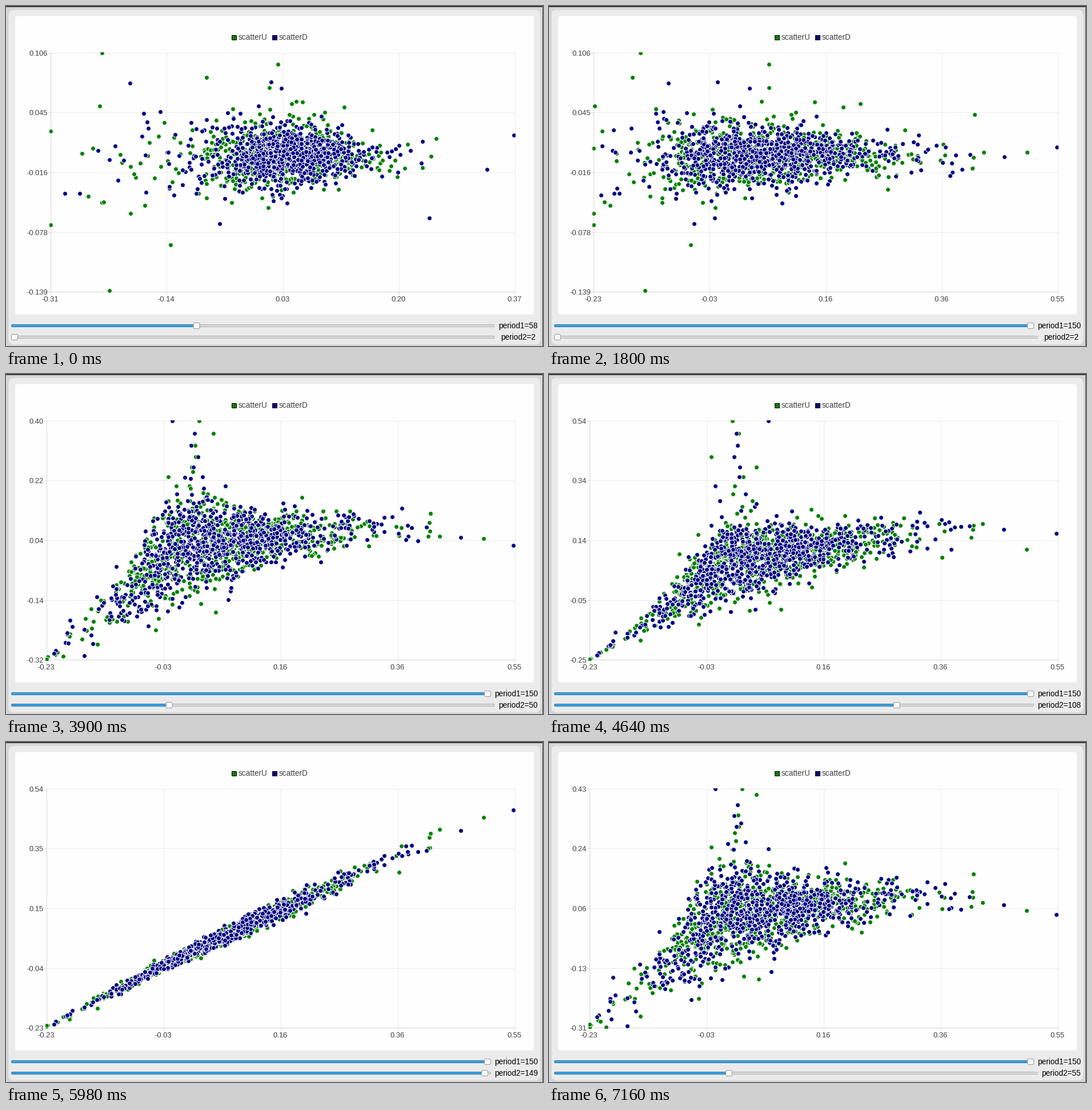
Write a matplotlib script that moves like this. It is 940 px wide and 595 px high and loops after 7.91 s.

```python
import numpy as np
import matplotlib.pyplot as plt
from matplotlib.animation import FuncAnimation
from matplotlib.patches import FancyBboxPatch, Rectangle

W, H, DPI = 940, 595, 100
LOOP, STEP = 7910, 35
PX = 72 / DPI
TOP, BOTTOM, RIGHT = 82, 500, 890
GREEN, NAVY = "#008000", "#000080"
plt.rcParams["font.family"] = "Liberation Sans"

# Key periods of both sliders and the axis ranges there
P1 = [58.5, 117.2, 150]
P2 = [2, 50, 55.2, 108.1, 149.1, 150]
X_LO, X_HI = [-.31, -.23, -.228], [.37, .49, .55]
Y_LO = [-.139, -.32, -.312, -.251, -.232, -.228]
Y_HI = [.1064, .40, .43, .54, .54, .55]

# Centre and half height of the cloud along x for periods 50, 108 and 149
BAND_X = [70, 160, 300, 450, 630, 890]
BAND_50 = [498, 420, 300, 287, 268, 297], [2, 50, 88, 42, 32, 10]
BAND_108 = [498, 442, 330, 305, 280, 273], [2, 20, 70, 45, 38, 22]
BAND_149 = [497, 450, 377, 307, 223, 120], [2, 8, 9, 18, 18, 40]

# A few far points: x at the three P1 keys and the first y
FAR_U = [(77, 77, 77, 383), (167, 159, 159, 82), (180, 152, 167, 498), (287, 239, 247, 418),
         (500, 778, 836, 256), (655, 859, 760, 256), (495, 550, 744, 190), (697, 616, 740, 284)]
FAR_D = [(102, 110, 113, 328), (216, 234, 208, 135), (640, 666, 888, 247), (670, 645, 796, 264),
         (841, 739, 722, 286), (609, 823, 701, 297), (888, 888, 646, 226), (740, 259, 289, 371)]


def warp(p):
    """Spread grows with sqrt(p) and collapses onto the diagonal near 150."""
    return np.sqrt(p) - np.sqrt(150 - np.asarray(p, float))


def widen(x):
    """Move x from the plot starting at 77 to the one starting at 70."""
    return 70 + (x - 77) * 820 / 813


def build(seed, far, n=830, plume=11):
    """x at the P1 keys and y at the P2 keys for one series."""
    rng = np.random.default_rng(seed)

    def mix(z, a):
        return a * z + np.sqrt(1 - a * a) * rng.normal(size=n)

    # Skewed bells with long tails
    z = rng.normal(size=n)
    xs = np.array([c + np.polyval([k3, k2, k1, 0], mix(z, .93)) for c, k1, k2, k3 in
                   ((492, 66, -7, 4.5), (380, 92, 6, 3), (375, 102, 6, 1))])
    v = rng.normal(size=n)
    s = np.interp(xs[2], [80, 250, 640, 890], [52, 29, 11, 25])
    y2 = 259 + s * (v + .05 * v ** 3)

    # A narrow plume rises from the cloud at larger second periods
    xs[2, :plume] = rng.normal(338, 23, plume)
    m = len(far)
    xs[:, -m:], y2[-m:] = np.array(far, float).T[:3], [p[3] for p in far]
    xs = np.clip(xs, 77, 889)
    xb = widen(xs[2])
    z = rng.normal(size=n)

    def band(centre, half, rise):
        y = np.interp(xb, BAND_X, centre) + np.interp(xb, BAND_X, half) * .5 * mix(z, .6)
        if rise:
            y[:plume] = 240 - rise * rng.permutation(np.linspace(.05, 1, plume)) ** 1.5
        return y

    y50, y108 = band(*BAND_50, 158), band(*BAND_108, 158)
    y55 = y50 + 7 * rng.normal(size=n)
    diagonal = BOTTOM - (xb - 70) * (BOTTOM - TOP) / 820
    ys = np.array([y2, y50, y55, y108, band(*BAND_149, 0), diagonal])
    return xs, np.clip(ys, TOP, BOTTOM - 1)


def blend(keys, rows, v):
    i = int(np.clip(np.searchsorted(keys, v) - 1, 0, len(keys) - 2))
    f = np.clip((v - keys[i]) / (keys[i + 1] - keys[i]), 0, 1)
    return rows[i] * (1 - f) + rows[i + 1] * f


def periods(t):
    """Both slider values at time t; they move in steps."""
    k = min(t // 150, 12)
    p1 = np.interp(k, [0, 6, 9, 12], [58.5, 117.2, 139, 150])
    if t >= 5980:
        p2 = np.interp((t - 5980) // 147.5, [0, 8], [149.1, 55.2])
    elif t >= 3300:
        k = (t - 3300) // 148.6 + 1
        p2 = np.interp(k, [0, 5, 10, 14, 16], [2, 50, 108.1, 141, 150])
    else:
        p2 = 2
    return p1, p2


fig = plt.figure(figsize=(W / DPI, H / DPI), dpi=DPI, facecolor="#d6d6d6")
ax = fig.add_axes([0, 0, 1, 1])
ax.set_xlim(-.5, W - .5)
ax.set_ylim(H - .5, -.5)
ax.axis("off")


def box(x, y, w, h, r, face, edge="none", z=1):
    return ax.add_patch(FancyBboxPatch(
        (x, y), w, h, boxstyle=f"round,pad=0,rounding_size={r}",
        fc=face, ec=edge, lw=PX, zorder=z))


def label(x, y, s="", size=13, color="#404044", ha="center"):
    return ax.text(x, y, s, fontsize=size * PX, color=color, ha=ha,
                   va="baseline", zorder=6)


def rule(color):
    return ax.plot([], [], color=color, lw=PX, zorder=2)[0]


class Slider:
    def __init__(self, name, y):
        self.name = name
        self.groove = box(9, y - 2, 845, 4, 2, "#d9d9d9", "#b2b2b2", 2)
        self.fill = box(9, y - 2, 9, 4, 2, "#3d9fdb", "#2b7fb5", 3)
        self.knob = box(9, y - 5, 11, 10, 2.5, "#fbfbfb", "#989898", 4)
        self.text = label(896, y + 5, size=13.6, color="#000000")

    def set(self, v):
        end, mid = (848, 892.5) if v >= 100 else (854.5, 896)
        x = 14.5 + (end - 20) * (v - 2) / 148
        self.groove.set_width(end - 9)
        self.fill.set_width(x - 9)
        self.knob.set_x(x - 5.5)
        self.text.set_x(mid)
        self.text.set_text(f"{self.name}={int(v)}")


# Window frame, panel and chart background
ax.add_patch(Rectangle((-1, -1), W + 1, 2.5, fc="#3a3a3a", lw=0))
ax.add_patch(Rectangle((W - 1.5, -1), 1, H + 1, fc="#4a4442", lw=0))
box(4, 6, 931, 586, 10, "#ebebeb")
box(15.5, 17, 908, 522, 4, "#fefefe")
for x, name, color in ((394, "scatterU", GREEN), (465.5, "scatterD", NAVY)):
    ax.add_patch(Rectangle((x, 51), 8, 8, fc=color, ec="black", lw=PX))
    label(x + 12, 59, name, 13.6, ha="left")

hlines = [rule("#ebebeb") for _ in range(5)]
vlines = [rule("#ebebeb") for _ in range(5)]
axis = rule("#d6d6d6")
ticks = [rule("#d6d6d6") for _ in range(10)]
xlabels = [label(0, 516.5) for _ in range(5)]
ylabels = [label(0, 0, ha="right") for _ in range(5)]
sliders = Slider("period1", 559), Slider("period2", 579)

series = []
for seed, far, color, z in ((4, FAR_U, GREEN, 4), (9, FAR_D, NAVY, 5)):
    dots, = ax.plot([], [], "o", ms=8 * PX, mfc=color, mec="white", mew=PX,
                    antialiased=False, zorder=z)
    series.append((dots, *build(seed, far)))


def update(i):
    p1, p2 = periods(i * STEP + 30)
    w = warp(p2)
    left, digits = (77, 3) if p2 == 2 else (70, 2)

    clip = Rectangle((left - 1.5, TOP - 1.5), RIGHT - left + 2, BOTTOM - TOP + 2,
                     transform=ax.transData)
    for dots, xs, ys in series:
        x = blend(P1, xs, p1)
        dots.set_data(x if left == 77 else widen(x), blend(warp(P2), ys, w))
        dots.set_clip_path(clip)

    xv = np.linspace(np.interp(p1, P1, X_LO), np.interp(p1, P1, X_HI), 5)
    yv = np.linspace(np.interp(w, warp(P2), Y_LO), np.interp(w, warp(P2), Y_HI), 5)
    for k in range(5):
        x = round(left + (RIGHT - left) * k / 4)
        y = round(BOTTOM - (BOTTOM - TOP) * k / 4)
        vlines[k].set_data([x, x], [TOP, BOTTOM])
        hlines[k].set_data([left, RIGHT], [y, y])
        ticks[k].set_data([x, x], [BOTTOM, BOTTOM + 4])
        ticks[k + 5].set_data([left - 4, left], [y, y])
        xlabels[k].set_x(x)
        xlabels[k].set_text(f"{xv[k]:.2f}")
        ylabels[k].set_position((left - 4.5, y + 4.5))
        ylabels[k].set_text(f"{yv[k]:.{digits}f}")
    axis.set_data([left, left, RIGHT], [TOP, BOTTOM, BOTTOM])

    for slider, v in zip(sliders, (p1, p2)):
        slider.set(v)
    return [s[0] for s in series]


anim = FuncAnimation(fig, update, frames=LOOP // STEP, interval=STEP,
                     repeat=True, repeat_delay=0, blit=False)
plt.show()
```
